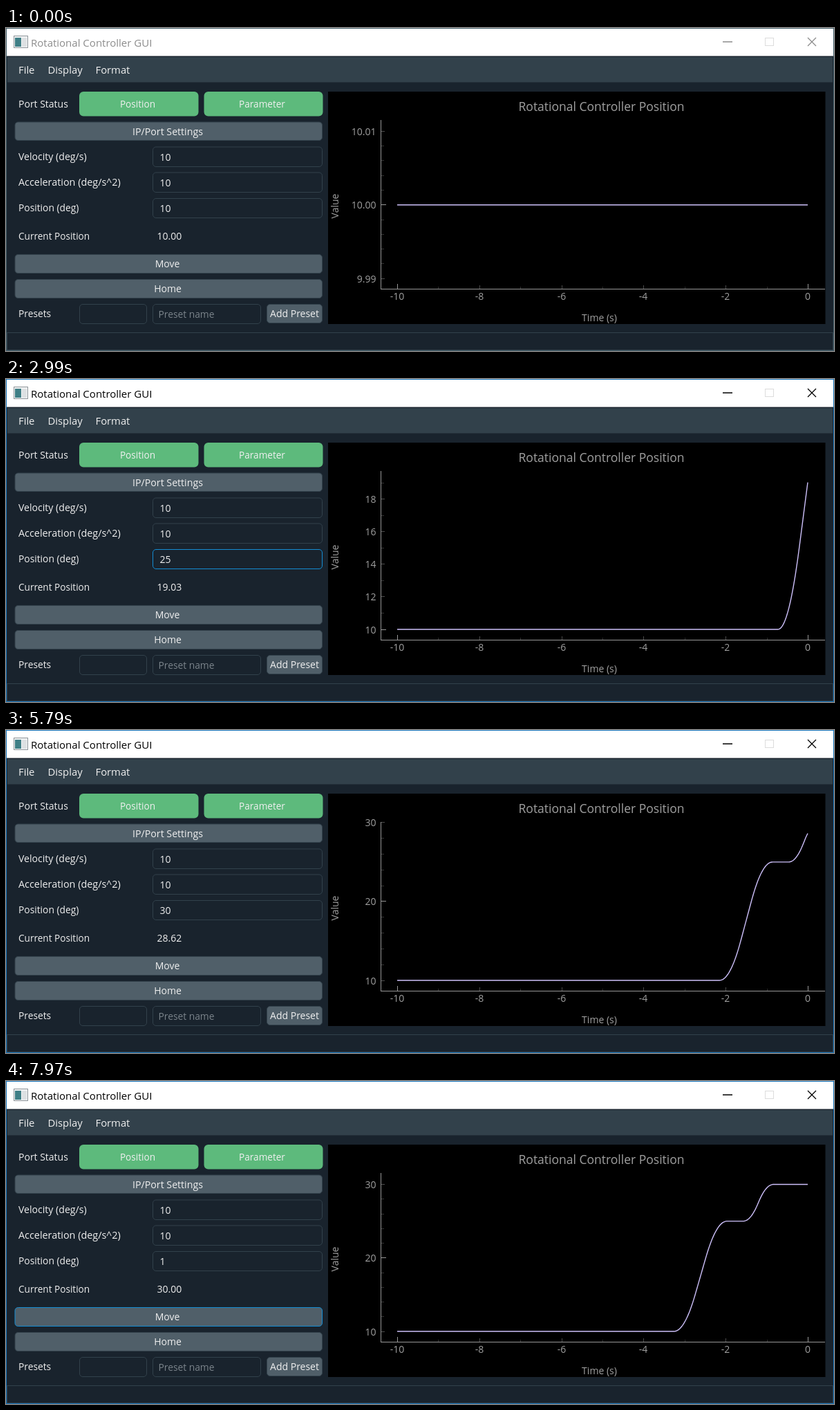
An HTML page that plays this animation: 1198 by 467 pixels, repeating every 8 s.

```html
<!DOCTYPE html>
<html lang="en">
<head>
<meta charset="utf-8">
<title>Rotational Controller GUI</title>
<style>
  html, body { margin: 0; width: 100%; height: 100%; overflow: hidden; background: #19232d; }
  svg { display: block; width: 1198px; height: 467px; }
  text { font: 14px "Open Sans", "Noto Sans", sans-serif; fill: #f0f0f0; white-space: pre; }
  .mid { text-anchor: middle; }
  .end { text-anchor: end; }
  .dim { fill: #a0a0a0; }
  .hint { fill: #7b848b; }
  .crisp { shape-rendering: crispEdges; }
  .field { fill: #19232d; stroke: #32414b; }
  .button { fill: #505f69; stroke: #32414b; }
  .port { fill: #5dba7c; }
  .field.hover, .button.hover { stroke: #148cd2; }
  .button.down { fill: #19232d; }
  .axis { stroke: #969696; fill: none; }
  .caret { stroke: #f0f0f0; }
  .win { stroke: #000; stroke-width: 1.3; fill: none; }
  .caption { fill: #000; }
  .frame { stroke: #1a77bd; fill: none; }
  .idle .win { stroke: #8c8c8c; }
  .idle .caption { fill: #8c8c8c; }
  .idle .frame { stroke: #46616c; }
</style>
</head>
<body>
<svg id="stage" viewBox="0 0 1198 467"></svg>
<script>
const NS = 'http://www.w3.org/2000/svg';
const stage = document.getElementById('stage');

function add(tag, attrs, parent = stage) {
  const el = document.createElementNS(NS, tag);
  for (const key in attrs) el.setAttribute(key, attrs[key]);
  return parent.appendChild(el);
}
function label(str, x, y, cls = '', size = 14, parent = stage) {
  const el = add('text', { x, y, class: cls, style: `font-size:${size}px` }, parent);
  el.textContent = str;
  return el;
}
function box(cls, x, y, right, bottom) {
  return add('rect', { class: cls, x: x + 0.5, y: y + 0.5, width: right - x - 1, height: bottom - y - 1, rx: 4.5 });
}
const fill = (x, y, width, height, color) => add('rect', { x, y, width, height, fill: color });
const line = (d, cls, parent, opacity = 1) => add('path', { d, class: cls + ' crisp', opacity }, parent);

// Window chrome
fill(0, 0, 1198, 40.5, '#fff');
fill(2, 42, 1194, 36.5, '#32414b');
fill(11, 11, 21, 18, '#8d9499');
fill(12, 12, 19, 16, '#f2f4f5');
fill(13, 14, 9, 13, '#3f7f86');
fill(23, 14, 7, 13, '#dde1e3');
label('Rotational Controller GUI', 36, 27, 'caption', 15);
add('path', { d: 'M1037 20H1051M1160 14L1172 26M1172 14L1160 26', class: 'win' });
add('rect', { x: 1098.5, y: 14.5, width: 12, height: 11, fill: 'none', stroke: '#dcdcdc', class: 'crisp' });
label('File', 18, 66, '', 14.8);
label('Display', 60.5, 66, '', 14.8);
label('Format', 129.5, 66, '', 14.8);
add('rect', { x: 1.5, y: 440.5, width: 1195, height: 25, fill: 'none', stroke: '#32414b', class: 'crisp' });

// Control panel
label('Port Status', 18, 115);
add('rect', { class: 'port', x: 106, y: 92, width: 172.5, height: 35.5, rx: 6 });
add('rect', { class: 'port', x: 286.5, y: 92, width: 172, height: 35.5, rx: 6 });
label('Position', 190.5, 115, 'mid', 13.6);
label('Parameter', 370.5, 115, 'mid', 13.6);
box('button', 12.5, 135.5, 458, 163);
label('IP/Port Settings', 234, 155, 'mid', 14.2);
label('Velocity (deg/s)', 18, 191, '', 14.1);
label('Acceleration (deg/s^2)', 18, 228, '', 14.4);
label('Position (deg)', 18, 265, '', 13.8);
box('field', 212, 171.5, 458, 201);
box('field', 212, 208.5, 458, 238);
const field = box('field', 212, 246, 458, 275);
label('10', 222.5, 192);
label('10', 222.5, 229);
const selection = fill(222, 252, 16, 18, '#1464a0');
const entry = label('', 222.5, 266);
const caret = line('', 'caret');
label('Current Position', 18, 306, '', 13.6);
const readout = label('', 218.5, 306);
const move = box('button', 12.5, 327, 458, 355);
label('Move', 233.5, 346, 'mid');
box('button', 12.5, 363, 458, 391);
label('Home', 234, 382, 'mid');
label('Presets', 18, 418, '', 13.8);
box('field', 106, 399, 204, 428);
box('field', 212, 399, 369, 428);
label('Preset name', 220.5, 419, 'hint', 13.8);
box('button', 377, 399, 458, 427);
label('Add Preset', 417.5, 418, 'mid');

// Plot
fill(466, 92, 719.5, 336, '#000');
label('Rotational Controller Position', 861.5, 120, 'mid dim', 17.5);
label('Time (s)', 858.5, 423.5, 'mid dim');
label('Value', 0, 0, 'mid dim').setAttribute('transform', 'translate(480.5 257.5) rotate(-90)');
line('M542.5 133V378', 'axis');
line('M542 377.5H1185', 'axis');
const ZERO_X = 1160, UNIT = 59.4, BASE_Y = 362, RISE = 212.5;
const TICK = [7, 5, 3.5];
for (let n = -10; n <= 0; n++) {
  const level = n % 10 === 0 ? 0 : n % 2 === 0 ? 1 : 2;
  const x = Math.round(ZERO_X + n * UNIT);
  line(`M${x + 0.5} 377V${377 - TICK[level]}`, 'axis', stage, 1 / (level + 1));
  if (level < 2) label(n, x, 392.5, 'mid dim');
}
const scale = add('g', {});
const curve = add('polyline', { fill: 'none', stroke: '#cdc0fa', 'stroke-width': 1.4 });
const auto = add('g', {});
add('rect', { x: 467, y: 410, width: 17, height: 17, rx: 3, fill: '#777' }, auto);
label('A', 475.5, 423.5, 'mid', 13, auto);
add('rect', { class: 'frame crisp', x: 0.5, y: 0.5, width: 1197, height: 466 });

// Trapezoid velocity profile: 10 deg/s limit, 10 deg/s^2 acceleration
function travel(t, dist) {
  const ramp = Math.min(1, Math.sqrt(dist / 10));
  const total = ramp + dist / (10 * ramp);
  if (t <= 0) return 0;
  if (t >= total) return dist;
  if (t < ramp) return 5 * t * t;
  if (t > total - ramp) return dist - 5 * (total - t) ** 2;
  return 5 * ramp * ramp + 10 * ramp * (t - ramp);
}
const PACE = 1.013;
const raw = t => 10 + travel((t - 1.569) / PACE, 15) + travel((t - 4.888) / PACE, 5);
const position = t => (raw(t - 0.04) + raw(t) + raw(t + 0.04)) / 3;

// Tick spacings, coarse to fine, for a visible value range
function spacings(range) {
  const ideal = range / 5.5;
  const unit = 10 ** Math.floor(Math.log10(ideal));
  const steps = ideal >= 2 * unit ? [20, 10, 2] : [10, 2, 1];
  return steps.map(s => s * unit).filter((s, i) => i < 2 || range / s <= 20);
}

function drawScale(lo, hi) {
  scale.replaceChildren();
  const perPx = (hi - lo) / RISE;
  const min = lo - 15.5 * perPx, max = hi + 17 * perPx;
  const used = new Set();
  spacings(max - min).forEach((step, level) => {
    const first = Math.ceil(min / step), last = Math.floor(max / step);
    const places = Math.max(0, Math.ceil(-Math.log10(step) - 1e-9));
    for (let n = first; n <= last; n++) {
      const value = n * step, y = BASE_Y - (value - lo) / perPx;
      const key = Math.round(y);
      if (used.has(key)) continue;
      used.add(key);
      line(`M543 ${Math.floor(y) + 0.5}h${TICK[level]}`, 'axis', scale, 1 / (level + 1));
      if (level < 2 || last - first < 9) label(value.toFixed(places), 535.5, y + 5.5, 'end dim', 14, scale);
    }
  });
}

const PLOT_RATE = 1.965; // playback seconds per plotted second
let shown = null;
function drawPlot(ms) {
  if (ms === shown) return;
  shown = ms;
  const t = ms / 1000, now = position(t);
  const flat = now - 10 < 0.005;
  const lo = flat ? 9.99 : 10, hi = flat ? 10.01 : now;
  const points = [];
  for (let i = -400; i <= 0; i++) {
    const s = i / 40;
    const y = BASE_Y - (position(t + PLOT_RATE * s) - lo) / (hi - lo) * RISE;
    points.push((ZERO_X + s * UNIT).toFixed(2) + ',' + y.toFixed(2));
  }
  curve.setAttribute('points', points.join(' '));
  readout.textContent = now.toFixed(2);
  drawScale(lo, hi);
}

// [start ms, field text, caret ('|' after text, '#' selected), pointer target]
const steps = [
  [0, '10', '', ''],
  [460, '10', '', 'field'],
  [710, '10', '|', 'field'],
  [800, '10', '#', ''],
  [890, '2', '|', ''],
  [1070, '25', '|', ''],
  [1110, '25', '|', 'move'],
  [1460, '25', '', 'press'],
  [1550, '25', '', 'move'],
  [1700, '25', '', ''],
  [2700, '25', '', 'field'],
  [3200, '25', '|', 'field'],
  [3320, '25', '#', ''],
  [3800, '3', '|', ''],
  [3980, '30', '|', ''],
  [4300, '30', '', 'move'],
  [4770, '30', '', 'press'],
  [4850, '30', '', 'move'],
  [5000, '30', '', ''],
  [6250, '30', '', 'field'],
  [6500, '30', '|', 'field'],
  [6600, '30', '#', ''],
  [7100, '1', '|', ''],
  [7300, '1', '|', 'move'],
  [7700, '1', '', 'move']
];

function drawPanel(ms) {
  const [, text, mark, target] = steps.findLast(s => s[0] <= ms);
  entry.textContent = text;
  selection.style.display = mark === '#' ? '' : 'none';
  caret.style.display = mark ? '' : 'none';
  const caretX = mark === '#' ? 222.5 : 223.5 + 8 * text.length;
  caret.setAttribute('d', `M${caretX} 252V270`);
  field.classList.toggle('hover', target === 'field');
  move.classList.toggle('hover', target === 'move');
  move.classList.toggle('down', target === 'press');
  stage.classList.toggle('idle', ms < 710);
  auto.style.display = ms >= 90 && ms < 200 ? '' : 'none';
}

const LOOP = 8000, MOVE_AT = 1460, TICK_MS = 10;
const begin = performance.now();
function render() {
  const ms = (performance.now() - begin) % LOOP;
  drawPlot(Math.max(MOVE_AT, Math.round(ms / TICK_MS) * TICK_MS));
  drawPanel(ms);
  requestAnimationFrame(render);
}
render();
</script>
</body>
</html>
```
